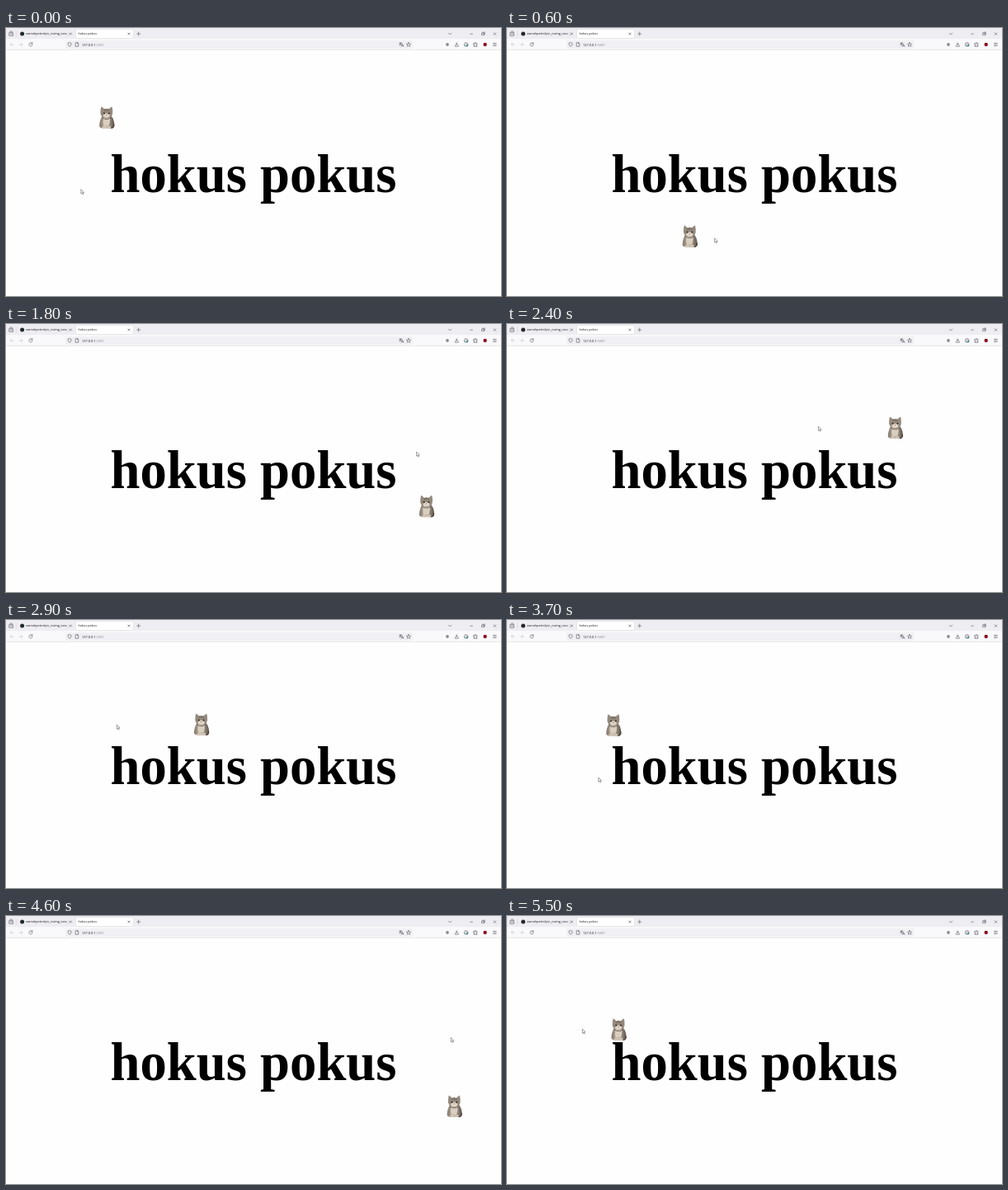
These frames come from a looping animation (600x325 px, 5600 ms). An HTML page:

```html
<!DOCTYPE html>
<html lang="cs">
<head>
<meta charset="utf-8">
<title>hokus pokus</title>
<style>
  html, body { margin: 0; width: 100%; height: 100%; overflow: hidden; background: #fefefe; }
  svg { display: block; width: 100%; height: 100%; }
  text { font-family: "Open Sans", "Noto Sans", sans-serif; font-size: 3.8px; fill: #15141a; }
  .title { font: bold 64.7px "Liberation Serif", "Times New Roman", serif; fill: #000; text-anchor: middle; }
  .icon { fill: none; stroke: #55545e; stroke-width: .6; stroke-linecap: round; stroke-linejoin: round; }
</style>
</head>
<body>
<svg viewBox="0 0 600 325">
  <defs>
    <linearGradient id="fur" x1="0" x2="1">
      <stop offset="0" stop-color="#82786d"/>
      <stop offset=".45" stop-color="#c3b5a4"/>
      <stop offset="1" stop-color="#5b544b"/>
    </linearGradient>
    <linearGradient id="fade">
      <stop offset=".85" stop-color="#15141a"/>
      <stop offset="1" stop-color="#15141a" stop-opacity=".1"/>
    </linearGradient>
  </defs>

  <rect width="600" height="325" fill="#fefefe"/>
  <rect width="600" height="13.5" fill="#eeeef2"/>
  <rect y="13.5" width="600" height="13" fill="#f9f9fb"/>
  <rect y="26.3" width="600" height=".6" fill="#dcdce1"/>

  <!-- tabs -->
  <rect x="84.5" y="1.6" width="70" height="11" rx="1.6" fill="#fff" stroke="#d2d2d9" stroke-width=".5"/>
  <path d="M12.5 3.5V10.5" stroke="#cfcfd6" stroke-width=".5"/>
  <circle cx="19.6" cy="7" r="2.5" fill="#24292f"/>
  <text x="24" y="8.3" style="fill:url(#fade)">varnokpetro/pic_roving_near_a</text>
  <text x="87.5" y="8.3">hokus pokus</text>
  <g class="icon">
    <path d="M4.2 5.6H8.4V9.4H4.2ZM4.9 4.2H7.7M5.2 7.2H7.4"/>
    <path d="M77.3 5.9l2.2 2.2m0-2.2l-2.2 2.2M147.9 5.9l2.2 2.2m0-2.2l-2.2 2.2"/>
    <path d="M158.7 7h4M160.7 5v4"/>
    <path d="M536.3 6.2l1.8 1.8 1.8-1.8M562.7 7.2h2.8"/>
    <path d="M577 6h2.4v2.6H577zM577.9 6v-.9h2.4v2.6h-.9M591.2 5.8l2.6 2.6m0-2.6l-2.6 2.6"/>
  </g>

  <!-- toolbar -->
  <rect x="72" y="15.3" width="421" height="9.6" rx="1.5" fill="#f0f0f4"/>
  <g class="icon">
    <path d="M9 20H5.2l1.7-1.7M5.2 20l1.7 1.7M16.2 20H20l-1.7-1.7M20 20l-1.7 1.7" stroke="#c2c2c9"/>
    <path d="M31.8 18.8a2.1 2.1 0 1 0 .3 1.7M32 17.6v1.5h-1.5"/>
    <path d="M77.2 17.7l1.9.7v1.3q0 1.8-1.9 2.7-1.9-.9-1.9-2.7v-1.3z"/>
    <path d="M84.6 17.7h2.1l1.1 1.1v3.5h-3.2zM86.6 17.8v1.1h1.1"/>
    <path d="M476.7 18.4h3M478.2 17.6v.8M479.2 18.4q-.6 1.8-2.3 2.4M477.3 19.2l1.5 1.4M479.2 22.4l1.3-3 1.3 3M479.7 21.4h1.6"/>
    <path d="M488 17.6l.7 1.6 1.8.2-1.3 1.2.3 1.7-1.5-.9-1.5.9.3-1.7-1.3-1.2 1.8-.2z"/>
    <path d="M546.3 17.7v2.7m-1.2-1.1l1.2 1.2 1.2-1.2M544.3 21v1.3h4V21"/>
    <circle cx="557.6" cy="20" r="2.3"/>
    <path d="M556.3 21.4q1.3-1.3 2.6 0M557.6 19v.4"/>
    <path d="M567 18.8h1.3q-.2-1.4.7-1.4t.7 1.4h1.3V20q-1.2-.1-1.2.6t1.2.7v1.1h-4v-1.1q1.1 0 1.1-.7t-1.1-.6z"/>
    <path d="M590.6 18.4h3.6M590.6 20h3.6M590.6 21.6h3.6"/>
  </g>
  <circle cx="535" cy="20" r="1.9" fill="#8d8c95"/>
  <circle cx="559.2" cy="21.4" r="1.1" fill="#2f8f9c"/>
  <circle cx="580.7" cy="20" r="2.2" fill="#8c1420"/>
  <text x="92" y="21.5" style="font-size:3.9px">127.0.0.1<tspan fill="#8f8f9b">:5000</tspan></text>

  <text class="title" x="300" y="198.7">hokus pokus</text>

  <g id="cat">
    <path d="M-5.5-2Q-9 5-8.8 10.5Q-8 13.3-3 13.2H5Q9.5 13 9.3 8.5Q9 2 5.5-2Z" fill="url(#fur)"/>
    <path d="M-7.5-5Q-7.6-10-6.6-13.2Q-4.5-12-3-10.4Q0-11 2.8-10.4Q4.5-12.3 6.4-13.2Q7.6-10 7.2-5Q6.5 .8 0 1Q-6.5 .8-7.5-5Z" fill="#94897d"/>
    <path d="M-3.8 0Q0 2.5 4 0Q4.6 5 2.8 10H-3.8Q-5 5-3.8 0Z" fill="#d9cec0"/>
    <ellipse cx="-.2" cy="-2.4" rx="4" ry="2.6" fill="#dfd5c8"/>
    <path d="M-2.2-9.8v2.2M0-10.2v2.4M2.2-9.8v2.2M-5.6 .3Q0 3.8 5.4 .3" fill="none" stroke="#5f564b" stroke-width=".8"/>
    <circle cx="-3" cy="-5" r="1.1" fill="#332f29"/>
    <circle cx="2.8" cy="-5" r="1.1" fill="#332f29"/>
    <circle cx="-.1" cy="-3.2" r=".6" fill="#a5695d"/>
    <ellipse cx="-2.8" cy="11.7" rx="2.7" ry="1.5" fill="#d3c7b8"/>
    <ellipse cx="2.7" cy="11.7" rx="2.7" ry="1.5" fill="#d3c7b8"/>
    <path d="M5.5 12.8Q9.4 12.5 8.7 8" fill="none" stroke="#453e36" stroke-width="1.3"/>
  </g>
  <g id="cursor">
    <path d="M-.4 0V5.2L.8 4.1L1.6 6L2.5 5.6L1.7 3.8H3.3Z" fill="#fff" stroke="#444" stroke-width=".5"/>
  </g>
</svg>
<script>
const STEP = 100, STEPS = 56;
const FOLLOW = .63;       // share of the gap the cat closes per step
const OFFSET = [25, .5];  // resting place of the cat beside the cursor

// Turning points of the hand: [step, x, y]
const turns = [
  [0, 91.3, 195.7], [2, 110, 250], [11, 429.5, 261], [16, 482, 250],
  [18, 498, 155], [22, 475, 123], [29, 134.7, 127], [30, 104, 127],
  [36, 104, 127], [37, 111.3, 191], [40, 105, 246], [43, 520, 243],
  [45, 532, 226], [46, 539.7, 147.5], [48, 520, 138], [53, 91.8, 137]
];

function cursorAt(step) {
  const next = turns.findIndex(p => p[0] > step);
  if (next < 0) return turns[turns.length - 1].slice(1);
  const [t0, x0, y0] = turns[next - 1], [t1, x1, y1] = turns[next];
  const u = (step - t0) / (t1 - t0);
  return [x0 + (x1 - x0) * u, y0 + (y1 - y0) * u];
}

// The cat chases where the cursor was one step earlier.
function catAt(step) {
  let pos = [122, 108.5];
  for (let i = 0; i < step; i++) {
    const goal = cursorAt(i);
    pos = pos.map((p, axis) => p + (goal[axis] + OFFSET[axis] - p) * FOLLOW);
  }
  return pos;
}

const cat = document.getElementById("cat");
const cursor = document.getElementById("cursor");
const place = (el, [x, y]) => el.setAttribute("transform", `translate(${x} ${y})`);

function draw(ms) {
  const step = Math.floor(ms / STEP) % STEPS;
  place(cat, catAt(step));
  place(cursor, cursorAt(step));
}

const start = performance.now();
function tick() {
  draw(performance.now() - start);
  requestAnimationFrame(tick);
}
tick();
</script>
</body>
</html>
```
